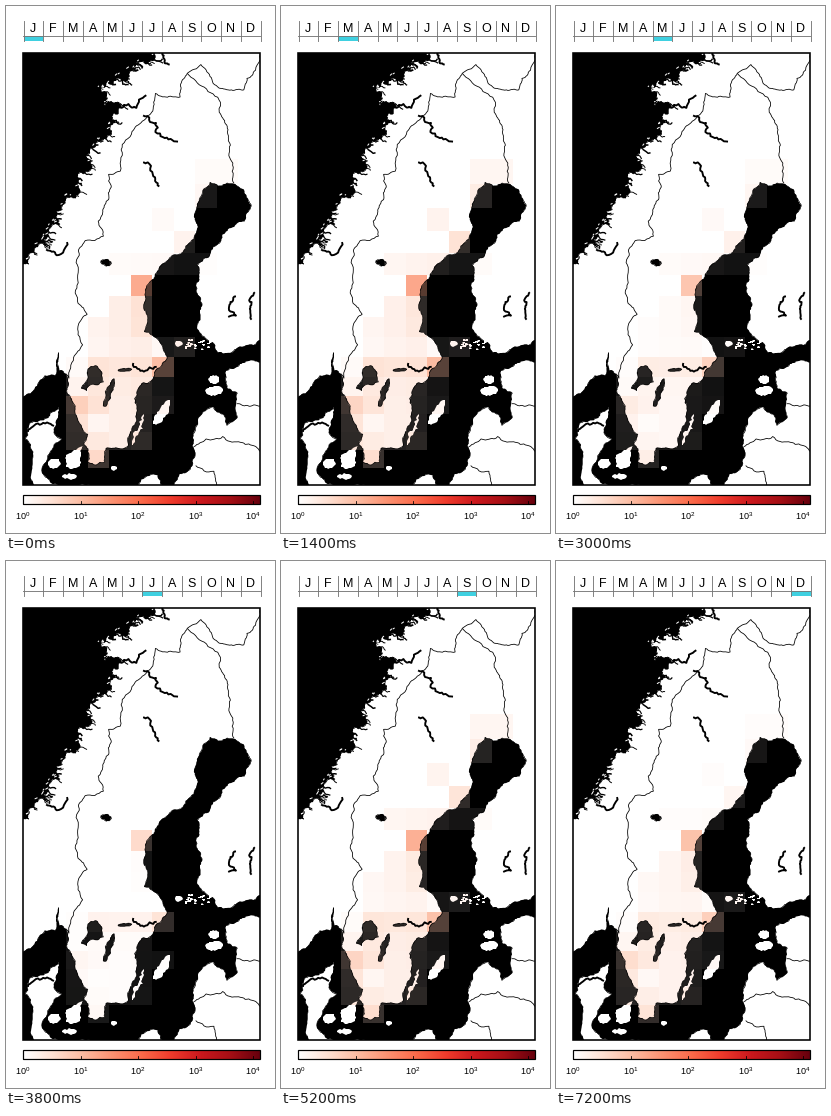
A matplotlib script for the animation above (7400 ms loop, 269 by 527 pixels).

```python
import numpy as np
import matplotlib.pyplot as plt
from matplotlib.animation import FuncAnimation
from matplotlib.colors import LinearSegmentedColormap
from matplotlib.patches import PathPatch, Rectangle
from matplotlib.path import Path

W, H, DPI = 269, 527, 64
PT = 72 / DPI                       # points per pixel
LEFT, RIGHT, TOP, BOTTOM = 17, 254, 47, 479
COLS, ROWS, FRAMES = 11, 20, 37
rng = np.random.default_rng(8)

REDS = LinearSegmentedColormap.from_list("reds", [
    "#ffffff", "#fee0d2", "#fcbba1", "#fc9272", "#fb6a4a",
    "#ef3b2c", "#cb181d", "#a50f15", "#67000d"])


def merc(lat):
    return 1325 - 744.85 * np.log(np.tan(np.pi / 4 + np.radians(lat) / 2))


def project(lonlat):
    """Mercator, straight to stage pixels."""
    lon, lat = np.asarray(lonlat, float).T
    return np.column_stack([13 * lon - 85.9, merc(lat)])


def rough(pts, amp, step=2.5):
    """Break long segments at displaced midpoints until they are short."""
    out = [pts[0]]

    def split(a, b):
        d = b - a
        if np.hypot(*d) < step:
            out.append(b)
            return
        mid = (a + b) / 2 + np.array([-d[1], d[0]]) * rng.uniform(-amp, amp)
        split(a, mid)
        split(mid, b)

    for a, b in zip(pts[:-1], pts[1:]):
        split(a, b)
    return np.array(out)


def ring(lonlat, amp=0.18):
    return Path(rough(project(lonlat + lonlat[:1]), amp), closed=True)


def blob(lon, lat, length, width, tilt):
    """Ragged ellipse, sizes in pixels, tilt in degrees from east."""
    t = np.linspace(0, 2 * np.pi, 12)
    c, s = np.cos(np.radians(tilt)), np.sin(np.radians(tilt))
    x, y = length / 2 * np.cos(t), width / 2 * np.sin(t)
    pts = project([(lon, lat)]) + np.column_stack([c * x - s * y, -s * x - c * y])
    return Path(rough(pts, 0.25), closed=True)


# Coasts in degrees (lon, lat)
WEST = [
    (7.5, 58), (8.8, 58.45), (9.6, 59), (10.4, 59), (10.65, 59.9),
    (10.7, 59.2), (11.2, 59.05), (11.3, 58.3), (12, 57.4), (12.9, 56.6),
    (12.6, 56.2), (13, 55.7), (12.9, 55.4)]
EAST = [
    (14.2, 55.4), (14.3, 56), (16, 56.1), (16.6, 57.1), (16.7, 58.4),
    (17.9, 58.85), (19, 59.75), (18.4, 60.35), (17.25, 60.7), (17.2, 61.7),
    (17.4, 62.3), (18.2, 62.85), (20.8, 63.9), (21.4, 64.4), (21.1, 64.8),
    (21.6, 65.4), (22.3, 65.85), (24.1, 65.8)]
FINLAND = [
    (24.9, 65.6), (25.4, 65), (24, 64.4), (22.8, 63.8), (21.3, 63.1),
    (21.2, 62.4), (21.5, 61.5), (21.3, 60.8), (22.2, 60.35), (22.9, 59.9),
    (24.6, 60.13), (26.5, 60.45)]
BALTIC = [
    (26.5, 59.55), (25, 59.53), (23.5, 59.2), (23.6, 58.5), (24.4, 58.3),
    (24.4, 57.3), (23.6, 56.97), (22.6, 57.75), (21.4, 57.3), (21, 56.6),
    (21.1, 55.6), (20.5, 54.97), (19.95, 54.9), (19.3, 54.25), (18.6, 54.3),
    (18.3, 54.83), (17, 54.65), (16, 54.2)]
DENMARK = [
    (14, 54), (12.5, 54.45), (11.5, 54.05), (10.2, 54.45), (9.5, 54.85),
    (9.8, 55.6), (10.3, 56.15), (10.9, 56.4), (10.35, 56.6), (10.6, 57.72),
    (9.5, 57.2), (8.5, 57.1), (8.1, 56.4), (8.6, 55.2), (8.9, 54.2),
    (7.5, 54.2)]
NORWAY = [
    (7.5, 63.05), (9.8, 63.75), (10.7, 64.6), (12.2, 65.5), (13.1, 66.55),
    (14.6, 67.5), (15.5, 68.1), (14.2, 68.15), (14.9, 68.85), (16.6, 69.3),
    (18.4, 69.8)]
VANERN = [
    (12.4, 58.5), (13.1, 59.35), (13.5, 59.4), (14, 59.1), (14.1, 58.75),
    (13.2, 58.65), (12.8, 58.4)]
ZEALAND = [(11.2, 55.7), (12.5, 56.1), (12.3, 55.25), (11.7, 55.1), (11.2, 55.2)]

# Islands and lakes: lon, lat, length, width, tilt
ISLANDS = [
    (11.5, 54.77, 15, 6, 0), (10.3, 55.33, 13, 10, 0), (18.6, 57.5, 29, 9, 58),
    (16.75, 56.8, 34, 4, 70), (14.93, 55.14, 6, 5, 0), (19.9, 60.25, 8, 6, 0),
    (22.6, 58.4, 18, 9, 10), (22.6, 58.85, 11, 9, 0)]
LAKES = [
    (14.52, 58.32, 30, 5, 70), (15.75, 59.23, 14, 3, 5), (14.3, 63.2, 11, 6, -10)]
CHANNELS = [
    [(17.15, 67.87), (18.15, 67.65), (19.84, 67.1)],
    [(17.15, 66.47), (17.9, 66.1), (18.4, 65.72)],
    [(16.4, 59.5), (18.2, 59.35)],
    [(23.7, 61.25), (24.3, 61.3), (23.8, 61.7), (24.3, 62)],
    [(25.5, 61.15), (25.4, 61.5), (25.75, 62.15)],
    [(8.3, 56.7), (9.2, 57), (10.3, 56.95)],
    [(9.7, 63.65), (10.5, 63.45), (11.3, 63.9)],
    [(15.4, 68.1), (17.4, 68.45)],
    [(18.9, 69.7), (19.2, 69.3)]]
BORDERS = [
    [(11.2, 59.08), (11.45, 58.9), (11.8, 59.7), (12.5, 60.2), (12.2, 61),
     (12.85, 61.35), (12.15, 61.75), (12, 63.2), (12.7, 63.95), (14.1, 64.1),
     (13.7, 64.6), (14.5, 65.3), (14.5, 66.1), (15.4, 66.2), (16.3, 67.4),
     (17.9, 68), (18.1, 68.5), (20, 68.4), (20.55, 69.06)],
    [(20.55, 69.06), (23.1, 68.25), (23.8, 66.8), (24.15, 65.82)],
    [(20.55, 69.06), (21.6, 69.3), (23, 68.65), (24.9, 68.6), (26.2, 69.75)],
    [(21.05, 56.07), (22, 56.4), (24.5, 56.28), (26.3, 55.7)],
    [(24.35, 57.87), (26.3, 57.8)],
    [(21.2, 55.25), (22.6, 55), (22.8, 54.3)]]

# Row from the bottom: first column, then strengths in percent of the scale
CELLS = {
    1: (3, 15), 2: (2, 11, 9, 7, 10), 3: (2, 12, 4, 7, 7),
    4: (2, 18, 12, 7, 8, 4), 5: (2, 5, 10, 8, 9, 2), 6: (2, 2, 11, 10, 11, 24),
    7: (3, 4, 6, 7, 3, 6), 8: (3, 5, 7, 11), 9: (4, 7, 12), 10: (5, 30),
    11: (4, 4, 5, 6, 2, 2), 12: (7, 12), 13: (6, 5), 14: (8, 8), 15: (8, 4, 4)}
KEYS = [0, 4, 11, 19, 26, 30, 36]
SOUTH = [1, 1.05, 0.7, 0.2, 0.9, 0.85, 0.75]
STEADY = [1, 1.1, 0.95, 0.47, 0.95, 0.95, 0.75]
MIDDLE = [1, 1.1, 0.5, 0.1, 0.7, 0.7, 0.6]
NORTH = [0.4, 1, 0.9, 0.05, 0.9, 0.35, 0.3]


def season(row):
    if row in (6, 10):
        return STEADY
    return SOUTH if row < 6 else MIDDLE if row < 10 else NORTH


def cell_colours(i):
    """Land and sea colours of the whole grid."""
    v = np.zeros((ROWS, COLS))
    for row, (first, *levels) in CELLS.items():
        level = np.array(levels) * np.interp(i, KEYS, season(row)) / 100
        v[row, first:first + len(levels)] = level
    v[v < 0.008] = 0
    land = REDS(v)[..., :3]
    shade = np.where(v > 0, np.minimum(0.35, 0.06 + 1.2 * v), 0)
    return land, land * shade[..., None]


fig = plt.figure(figsize=(W / DPI, H / DPI), dpi=DPI, facecolor="white")
ax = fig.add_axes([0, 0, 1, 1])
ax.axis("off")
box = Rectangle((LEFT, TOP), RIGHT - LEFT, BOTTOM - TOP,
                fc="none", ec="black", lw=1.6 * PT, zorder=9)
ax.add_patch(box)


def stroke(pts, width, color="black"):
    line, = ax.plot(*np.asarray(pts).T, color=color, lw=width * PT, zorder=4,
                    solid_capstyle="butt")
    line.set_clip_path(box)


# Shapes of sea, lakes and islands
fjords = rough(project(NORWAY), 0.35, 2)
ocean = Path(np.vstack([fjords, [(150, 30), (0, 30), (0, 270), fjords[0]]]),
             closed=True)
gulf = ring(WEST + EAST + FINLAND + BALTIC + DENMARK)
water = Path.make_compound_path(ocean, gulf, ring(VANERN),
                                *[blob(*b) for b in LAKES])
islets = [blob(x, y, 3, 1.8, 0) for x, y in
          zip(rng.uniform(20.4, 22.4, 24), rng.uniform(59.95, 60.4, 24))]
isles = Path.make_compound_path(ring(ZEALAND), *[blob(*b) for b in ISLANDS],
                                *islets)

# Grid meshes: land below, sea clipped to water, land again on the islands
xs = np.linspace(LEFT, RIGHT, COLS + 1)
ys = merc(np.linspace(54.4, 69.6, ROWS + 1))
ys[0], ys[-1] = BOTTOM, TOP
land, sea = cell_colours(0)
land_mesh = ax.pcolormesh(xs, ys, land, zorder=1)
sea_mesh = ax.pcolormesh(xs, ys, sea, zorder=2)
isle_mesh = ax.pcolormesh(xs, ys, land, zorder=5)
sea_mesh.set_clip_path(water, transform=ax.transData)
isle_mesh.set_clip_path(isles, transform=ax.transData)
shore = PathPatch(water, fc="none", ec="black", lw=0.7 * PT, zorder=3)
ax.add_patch(shore)
shore.set_clip_path(box)

for pts in CHANNELS:
    stroke(rough(project(pts), 0.3), 1.9)
for pts in BORDERS:
    stroke(rough(project(pts), 0.15, 3), 0.8)

# Small fjords and skerries along the north-west coast
for p in fjords[rng.integers(0, len(fjords), 60)]:
    tip = p + rng.uniform(3, 9) * np.array([1, rng.uniform(-0.3, 0.8)])
    stroke(rough(np.array([p, tip]), 0.35), rng.uniform(0.8, 1.6))
for p in fjords[rng.integers(0, len(fjords), 40)]:
    a = p - rng.uniform(0.5, 4, 2)
    stroke([a, a + (rng.uniform(1, 3), -rng.uniform(0.5, 2))], 1, "white")

# Month strip
STEP = (RIGHT - LEFT) / 12
GREY = dict(color="#777777", lw=0.9 * PT, zorder=6)
ax.plot([LEFT, RIGHT], [30, 30], **GREY)
for k in range(13):
    x = LEFT + 0.5 + k * STEP
    ax.plot([x, x], [15, 35], **GREY)
for k, letter in enumerate("JFMAMJJASOND"):
    ax.text(LEFT + (k + 0.53) * STEP, 26.5, letter, ha="center", va="baseline",
            family="Liberation Sans", fontsize=12.5 * PT)
marker = Rectangle((LEFT, 30), STEP, 5, fc="#3fd0e0", ec="none", zorder=5)
ax.add_patch(marker)

# Colour scale
ax.imshow(REDS(np.linspace(0, 1, 256))[None], aspect="auto",
          extent=(LEFT, RIGHT, 498, 489), zorder=1)
ax.add_patch(Rectangle((LEFT, 489), RIGHT - LEFT, 9, fc="none", ec="black",
                       lw=1.2 * PT, zorder=2))
for k in range(5):
    x = LEFT + 57.5 * k
    ax.plot([x, x], [495, 498], color="black", lw=0.8 * PT, zorder=3)
    ax.text(x, 514, rf"$\mathregular{{10^{k}}}$", ha="center", va="baseline",
            family="Liberation Sans", fontsize=9 * PT)

ax.set_xlim(0, W)
ax.set_ylim(H, 0)


def update(i):
    """Each step is ten days of the year."""
    day = np.datetime64("2001-01-01") + 10 * i
    month = day.astype("datetime64[M]").astype(int) % 12
    marker.set_x(LEFT + 0.5 + month * STEP)
    land, sea = cell_colours(i)
    land_mesh.set_array(land)
    isle_mesh.set_array(land)
    sea_mesh.set_array(sea)
    return marker, land_mesh, sea_mesh, isle_mesh


anim = FuncAnimation(fig, update, frames=FRAMES, interval=200, repeat=True)
plt.show()
```
